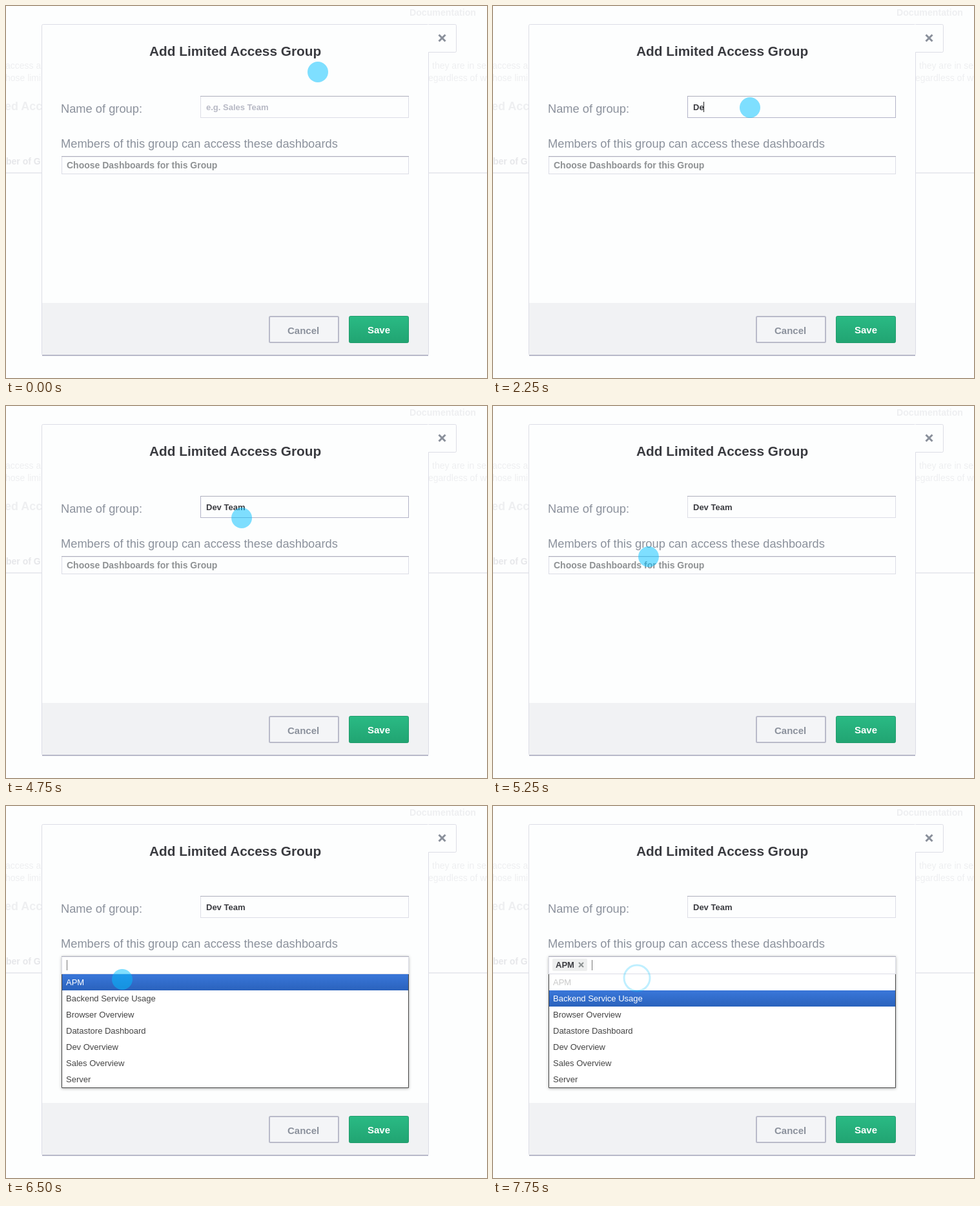
Write an HTML page that moves like this. It is 745 px wide and 575 px high and loops after 8000 ms.

```html
<!DOCTYPE html>
<html lang="en">
<head>
<meta charset="utf-8">
<title>Add Limited Access Group</title>
<style>
  html, body { margin: 0; width: 100%; height: 100%; overflow: hidden; background: #fdfefe; }
  svg { display: block; font-family: "Liberation Sans", Arial, sans-serif; }
  text { white-space: pre; }
  .bold { font-weight: bold; }
  .faded { font-size: 14px; fill: #eeeff1; }
  .label { font-size: 18.3px; fill: #8b919c; }
  .small { font-size: 13px; }
  .ink { fill: #3a3b40; }
  .line { stroke: #dcdde6; fill: none; }
  .edge { stroke: #adaebc; fill: none; }
  #name.focus { stroke: #b3b4c8; }
</style>
</head>
<body>
<svg width="745" height="575" viewBox="0 0 745 575">
  <defs>
    <linearGradient id="blue" x2="0" y2="1">
      <stop offset=".1" stop-color="#3875d7"/><stop offset="1" stop-color="#2a62bc"/>
    </linearGradient>
    <linearGradient id="green" x2="0" y2="1">
      <stop stop-color="#2aba84"/><stop offset="1" stop-color="#21a472"/>
    </linearGradient>
    <filter id="shadow" x="-5%" y="-10%" width="110%" height="120%">
      <feDropShadow dx="0" dy="1" stdDeviation="2" flood-opacity=".3"/>
    </filter>
  </defs>

  <!-- page behind the dialog -->
  <g class="faded">
    <text class="bold" x="625" y="15" style="font-size:14.15px">Documentation</text>
    <text x="-1" y="97">access al</text>
    <text x="-5" y="116">those limi</text>
    <text x="660" y="97">they are in se</text>
    <text x="654" y="116">egardless of w</text>
    <text class="bold" x="-2" y="161" style="font-size:18px">ed Acc</text>
    <text class="bold" x="0" y="245" style="fill:#e6e7ea">ber of G</text>
    <path d="M0 258H745" stroke="#eaebef" stroke-width="2"/>
  </g>

  <!-- dialog -->
  <rect x="55.5" y="28.5" width="599" height="511" rx="2" fill="#fdfefe" stroke="#dcdde6"/>
  <path d="M654.5 28.5H695.500q2 0 2 2V69.500q0 2 -2 2H654.500" fill="#fdfefe" stroke="#dcdde6"/>
  <path d="M654 29V71" stroke="#fdfefe" stroke-width="3"/>
  <path d="M670.500 44.500l10 10m0 -10l-10 10" stroke="#8a909b" stroke-width="3"/>
  <rect x="56" y="459" width="598" height="80" fill="#f1f2f4"/>
  <path d="M56 540H654" stroke="#b7b8c9" stroke-width="2"/>
  <text class="bold ink" x="222" y="77" font-size="20.8">Add Limited Access Group</text>
  <text class="label" x="85" y="165">Name of group:</text>
  <text class="label" x="85" y="219">Members of this group can access these dashboards</text>

  <rect x="408" y="480" width="107" height="40" rx="1.500" fill="#f4f5f7" stroke="#b9bac9" stroke-width="2"/>
  <text class="bold" x="436" y="507" font-size="15" fill="#8b919c">Cancel</text>
  <rect x="531.5" y="479.500" width="92" height="41" rx="2" fill="url(#green)" stroke="#1f9c6b"/>
  <text class="bold" x="560" y="506" font-size="15" fill="#fff">Save</text>

  <!-- name field -->
  <rect id="name" class="line" x="301.500" y="139.500" width="322" height="33"/>
  <path class="edge" d="M301 139.500H624"/>
  <text id="hint" class="bold small" x="310" y="161" fill="#b6b8c4">e.g. Sales Team</text>
  <text id="typed" class="bold small ink" x="310" y="161"></text>
  <path id="nameCaret" d="M.5 148V164" stroke="#222"/>

  <!-- dashboard picker -->
  <g id="pickerGlow" filter="url(#shadow)"><rect x="86" y="232" width="538" height="204" fill="#fff"/></g>
  <rect class="line" x="86.500" y="232.500" width="537" height="27"/>
  <path class="edge" d="M86 232.500H624"/>
  <path d="M87 233.500H623" stroke="#eeeef2"/>
  <text id="choose" class="bold" x="94" y="251" font-size="14" fill="#8e9193">Choose Dashboards for this Group</text>
  <g id="chip">
    <rect x="92" y="236" width="54" height="19" rx="2" fill="#eeefef"/>
    <text class="bold small ink" x="97" y="250">APM</text>
    <path d="M133 242l7 7m0 -7l-7 7" stroke="#8b9090" stroke-width="2"/>
  </g>
  <path id="pickCaret" d="M.5 238V254" stroke="#777"/>
  <g id="list" class="small">
    <rect x="87" y="260" width="536" height="175" fill="#fff"/>
    <rect id="highlight" x="87" width="536" height="25" fill="url(#blue)"/>
    <path d="M86.500 260V435.500H623.500V260" fill="none" stroke="#444"/>
  </g>

  <circle id="disc" r="16" fill="#00bfff" fill-opacity=".5"/>
  <circle id="ring" fill="none" stroke="#00bfff" stroke-width="3"/>
</svg>
<script>
const LOOP = 8000, STEP = 250, RING_LIFE = 600;
const $ = id => document.getElementById(id);
const show = (id, on) => $(id).style.display = on ? "" : "none";
const moveX = (id, x) => $(id).setAttribute("transform", `translate(${x} 0)`);
const set = (id, attrs) => {
  for (const key in attrs) $(id).setAttribute(key, attrs[key]);
};

const items = ["APM", "Backend Service Usage", "Browser Overview", "Datastore Dashboard",
  "Dev Overview", "Sales Overview", "Server"];
const rows = items.map((label, i) => {
  const row = document.createElementNS("http://www.w3.org/2000/svg", "text");
  row.setAttribute("x", 93);
  row.setAttribute("y", 277 + 25 * i);
  row.textContent = label;
  return $("list").appendChild(row);
});

// Each move ends in a click.
const moves = [
  { start: 0, end: 800, click: 950, from: [483, 102], to: [398, 157] },
  { start: 4500, end: 5250, click: 5280, from: [398, 157], to: [241, 233] },
  { start: 5900, end: 6500, click: 6560, from: [241, 233], to: [180, 268] },
  { start: 7160, end: 7450, click: 7450, from: [180, 268], to: [223, 250] }
];
const typing = [[2000, "D"], [2250, "De"], [2750, "Dev"], [3000, "Dev "],
  [3750, "Dev T"], [4000, "Dev Tea"], [4250, "Dev Team"]];

const between = (t, a, b) => t >= a && t < b;
const ease = p => p * p * p * (p * (6 * p - 15) + 10);

function drawPointer(t) {
  const move = moves.findLast(m => t >= m.start);
  const p = ease(Math.min(1, (t - move.start) / (move.end - move.start)));
  const [x, y] = move.from.map((v, i) => v + (move.to[i] - v) * p);
  const age = t - move.click;
  const clicked = between(age, 0, RING_LIFE);
  show("disc", !clicked);
  show("ring", clicked);
  set("disc", { cx: x, cy: y });
  if (clicked) set("ring", {
    cx: x, cy: y + 16,
    r: 21.5 - 9 * Math.exp(-age / 170),
    "stroke-opacity": 0.5 * (1 - age / RING_LIFE)
  });
}

function drawName(t) {
  const text = typing.findLast(([at]) => t >= at)?.[1] ?? "";
  $("typed").textContent = text;
  show("hint", !text);
  $("name").classList.toggle("focus", between(t, 1000, 5250));
  show("nameCaret", between(t, 1000, 4750) && !between(t, 3500, 3750));
  moveX("nameCaret", Math.floor(310 + (text ? $("typed").getComputedTextLength() : 0)));
}

function drawPicker(t) {
  const chosen = t >= 6750;
  const open = t >= 5500 && !between(t, 6750, 7500);
  show("choose", t < 5500);
  show("chip", chosen);
  show("pickCaret", open);
  moveX("pickCaret", chosen ? 153 : 94);
  show("list", open);
  show("pickerGlow", open);
  const active = chosen ? 1 : 0;
  set("highlight", { y: 260 + 25 * active });
  rows.forEach((row, i) => {
    row.style.fill = i === active ? "#fff" : i < active ? "#c8c8c8" : "#444";
  });
}

function frame() {
  const t = Math.floor(performance.now() % LOOP / STEP) * STEP;
  drawPointer(t);
  drawName(t);
  drawPicker(t);
  requestAnimationFrame(frame);
}
frame();
</script>
</body>
</html>
```
